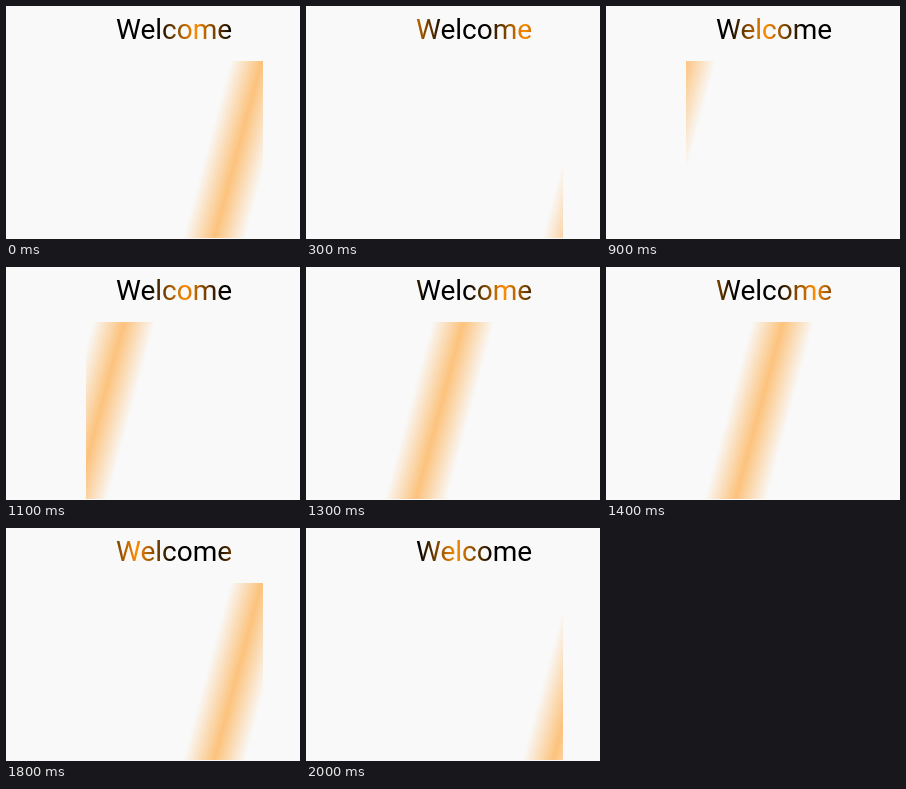
Recreate the animation shown at these times as an HTML page. Size 294 by 233 pixels, loop 2100 ms.

```html
<!DOCTYPE html>
<html lang="en">
<head>
<meta charset="utf-8">
<title>Welcome</title>
<style>
  html, body {
    margin: 0;
    width: 100%;
    height: 100%;
    overflow: hidden;
    background: #f9f9f9;
  }

  .title, .card {
    position: absolute;
    animation: 2.1s steps(21, end) infinite;
  }

  /* The highlight repeats every 117px and crosses in 1.2s */
  .title {
    left: 110px;
    top: 7px;
    margin: 0;
    font: 400 28px/33px Roboto, sans-serif;
    white-space: nowrap;
    color: transparent;
    background: linear-gradient(90deg, #000 18%, #ff8c00 50%, #000 82%) 0 0 / 117px 100%;
    -webkit-background-clip: text;
    background-clip: text;
    animation-name: title-shine;
  }

  /* The band repeats every 354px and crosses in 1.8s */
  .card {
    left: 80px;
    top: 55px;
    width: 177px;
    height: 177px;
    background: linear-gradient(105deg,
      rgba(255, 140, 0, 0) 42.2%,
      rgba(255, 140, 0, .5) 50%,
      rgba(255, 140, 0, 0) 57.8%) 0 0 / 354px 100%;
    animation-name: card-shine;
  }

  @keyframes title-shine {
    from { background-position-x: 20.5px; }
    to { background-position-x: 225.25px; }
  }

  @keyframes card-shine {
    from { background-position-x: -25px; }
    to { background-position-x: 388px; }
  }
</style>
</head>
<body>
  <h1 class="title">Welcome</h1>
  <div class="card"></div>
</body>
</html>
```
